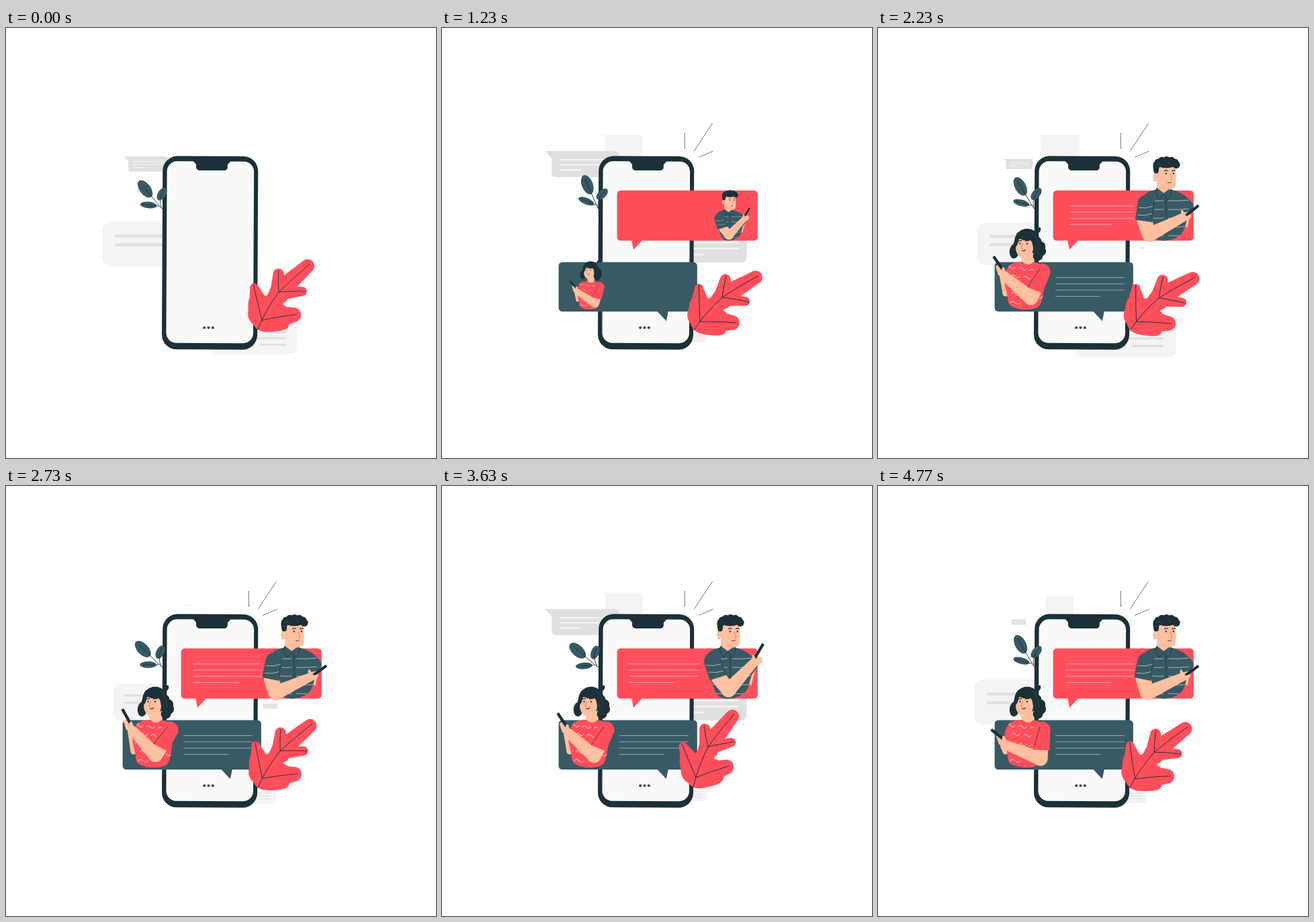
These frames come from a looping animation (640 px wide and 640 px high, 4810 ms). An HTML page with a canvas:

```html
<!DOCTYPE html>
<html lang="en">
<head>
<meta charset="utf-8">
<title>Chat</title>
<style>
html, body { margin: 0; width: 100%; height: 100%; overflow: hidden; background: #fff; }
canvas { display: block; width: 100vmin; height: 100vmin; }
</style>
</head>
<body>
<canvas id="stage" width="640" height="640"></canvas>
<script>
const g = document.getElementById('stage').getContext('2d');
const LOOP = 4810, CYCLE = 2400;
const NAVY = '#1b3039', TEAL = '#385a64', RED = '#ff4f5b', SKIN = '#ffc09f';
const LIGHT = '#f4f4f4', GREY = '#e0e0e0', WHITE = '#fafafa', LIP = '#6a2b2f', NOSE = '#c8705c';
const PI = Math.PI;

// Timing
const wave = u => (1 - Math.cos(2 * PI * u / CYCLE)) / 2;
const fall = x => (1 + Math.cos(PI * x)) / 2;
const mix = (a, b, k) => a + (b - a) * k;
const ramp = (t, from, to) => Math.min(1, Math.max(0, (t - from) / (to - from)));
const ease = (t, from, to) => 1 - fall(ramp(t, from, to));

const leafAngle = t => 49.8 - 16.5 * ramp(t, 0, 1780) + 25.9 * ease(t, 1780, 3550) - 26.2 * ease(t, 3550, 5835);
const twigAngle = t => 40.6 - 18.6 * ramp(t, 0, 1450) + 32.5 * ease(t, 1620, 3250) - 23 * ease(t, 3250, 4800);
const girlReach = t => .45 + .53 * ease(t, 1900, 2600) - .5 * ease(t, 2600, 3300) +
  .52 * ease(t, 3300, 3950) - ease(t, 3950, 4770);
const manReach = t => 1.18 * wave(t - 140) - .05;

// Drawing helpers
function placed(x, y, sx, sy, angle, draw) {
  g.save();
  g.translate(x, y);
  g.rotate(angle * PI / 180);
  g.scale(sx, sy);
  draw();
  g.restore();
}
function around(x, y, sx, sy, angle, draw) {
  placed(x, y, sx, sy, angle, () => { g.translate(-x, -y); draw(); });
}
function fill(color) { g.fillStyle = color; g.fill(); }
function poly(color, ...p) {
  g.beginPath();
  for (let i = 0; i < p.length; i += 2) g.lineTo(p[i], p[i + 1]);
  g.closePath();
  fill(color);
}
// Smooth closed curve through a few points
function blob(color, ...p) {
  const n = p.length, at = i => p[(i + n) % n];
  g.beginPath();
  g.moveTo(p[0], p[1]);
  for (let i = 0; i < n; i += 2) {
    const c = [0, 1].map(k => at(i + k) + (at(i + 2 + k) - at(i - 2 + k)) / 6);
    const d = [0, 1].map(k => at(i + 2 + k) - (at(i + 4 + k) - at(i + k)) / 6);
    g.bezierCurveTo(...c, ...d, at(i + 2), at(i + 3));
  }
  fill(color);
}
function box(color, x, y, w, h, r) {
  g.beginPath();
  g.roundRect(x, y, w, h, r);
  fill(color);
}
function oval(color, x, y, rx, ry = rx, angle = 0) {
  g.beginPath();
  g.ellipse(x, y, rx, ry, angle * PI / 180, 0, 2 * PI);
  fill(color);
}
function stroke(color, width, x1, y1, x2, y2, cx = (x1 + x2) / 2, cy = (y1 + y2) / 2) {
  g.beginPath();
  g.moveTo(x1, y1);
  g.quadraticCurveTo(cx, cy, x2, y2);
  g.strokeStyle = color;
  g.lineWidth = width;
  g.stroke();
}
// Tapered stroke with round ends
function limb(color, x1, y1, r1, x2, y2, r2) {
  const a = Math.atan2(y2 - y1, x2 - x1), s = Math.sin(a), c = Math.cos(a);
  oval(color, x1, y1, r1);
  oval(color, x2, y2, r2);
  poly(color, x1 - s * r1, y1 + c * r1, x2 - s * r2, y2 + c * r2,
    x2 + s * r2, y2 - c * r2, x1 + s * r1, y1 - c * r1);
}
// Sleeve with a round shoulder and a straight hem
function sleeve(color, x, y, hemX, hemY, r) {
  const a = Math.atan2(hemY - y, hemX - x);
  placed(x, y, 1, 1, a * 180 / PI, () =>
    box(color, -r, -r, Math.hypot(hemX - x, hemY - y) + r, 2 * r, [r, 1, 1, r]));
}
function rows(count, draw) {
  for (let i = 0; i < count; i++) draw(i);
}

// Pulsing bubbles behind the phone
function pulse(x, y, scale, draw) {
  if (scale > .004) placed(x, y, scale, scale, 0, draw);
}
function backBubbles(t) {
  pulse(269, 177.5, t < 540 ? 0 : wave(t - 540), () => {
    box(LIGHT, -42, -29, 90, 58, 5);
    poly(LIGHT, -48, -29, -36, -29, -36, -18);
  });
  pulse(208.5, 202.5, 1.025 * (t < 310 ? fall((t + 300) / 610) : wave(t - 310)), () => {
    box(GREY, -50.5, -21.5, 112, 43, [0, 6, 6, 6]);
    poly(GREY, -61.5, -21.5, -50, -21.5, -50, -9);
    rows(3, i => box(LIGHT, -36.5, -8.5 + 8.5 * i, i < 2 ? 87 : 35, 2.6, 1.3));
  });
  pulse(238.5, 321.5, 1 - wave(t), () => {
    box(LIGHT, -95.5, -33.5, 190, 67, 13);
    rows(2, i => box(GREY, -76.5, -14 + 13 * i, 150, 4.2, 2));
  });
  pulse(393.5, 327.5, wave(t) * 1.48, () => {
    box(GREY, -40.5, -14.5, 81, 29, 5);
    rows(3, i => box(LIGHT, -33, -6.4 + 6 * i, i < 2 ? 65.5 : 31, 1.8, .9));
  });
  pulse(375.5, 461, 1.25 * (t < 4430 ? wave(t - 830) : fall((t - 4430) / 560)), () => {
    box(LIGHT, -70.5, -25, 129, 50, [8, 0, 8, 8]);
    poly(LIGHT, 50, -25, 70.5, -25, 58.5, -12);
    rows(3, i => box(GREY, i < 2 ? -52 : 2.5, -10.5 + 9.8 * i, i < 2 ? 94.5 : 40, 3, 1.5));
  });
}

function phone() {
  around(303.5, 335, 1, 1, .28, () => {
    box(NAVY, 232.6, 190.8, 142, 287.8, 22);
    box(WHITE, 239, 198.6, 129.5, 270.3, 15);
    poly(NAVY, 278, 198, 334, 198, 329.2, 203, 282.4, 203);
    box(NAVY, 282.4, 198, 46.8, 14, [0, 0, 5, 5]);
  });
  rows(3, i => oval('#2f5665', 295.2 + 6.3 * i, 446, 2.2, 1.9));
}

function twig(angle) {
  around(234, 270, 1, 1, 40.6 - angle, () => {
    oval(TEAL, 207, 239.5, 15, 8.3, 53);
    oval(TEAL, 212.2, 263.5, 12.3, 4.9, 6);
    oval(TEAL, 232, 247, 10.5, 6, -58);
    stroke(NAVY, .9, 234, 271, 202, 232, 222, 258);
    stroke(NAVY, .8, 228, 265, 204, 262.5, 218, 265);
    stroke(NAVY, .8, 231.5, 268, 235, 241, 226, 254);
  });
}

// Each lobe: root, root radius, tip, tip radius
const lobes = [
  [380, 425, 20, 369.5, 386.5, 6.5],
  [389, 432, 19.5, 428, 427, 11],
  [405, 393, 12, 405.5, 366, 8],
  [410, 395, 10, 441, 392, 6.7],
  [412, 387, 14, 449, 354, 10]
];
function leaf(angle) {
  around(372, 452, 1, 1, 49.8 - angle, () => {
    blob(RED, 375, 449, 363, 430, 361, 406, 372, 392, 387, 398.5, 396, 384, 414, 371.5,
      431, 380, 419, 404, 412, 411, 419, 418, 420, 445, 396, 452);
    for (const lobe of lobes) limb(RED, ...lobe);
    stroke(NAVY, .9, 374.5, 449, 406, 393, 385, 422);
    lobes.forEach(([, , , x, y], i) => {
      const [rootX, rootY] = i < 2 ? [381, 435] : [406, 393];
      const reach = 5 / Math.hypot(x - rootX, y - rootY);
      stroke(NAVY, .9, rootX, rootY, x + (x - rootX) * reach, y + (y - rootY) * reach,
        (x + rootX) / 2 - 1, (y + rootY) / 2 - 1);
    });
  });
}

function rays(t) {
  const k = ease(t, 130, 500);
  if (!k) return;
  for (const [x1, y1, x2, y2] of [[361.4, 180, 361, 156], [375, 183.5, 402.5, 142], [382, 192.5, 403.5, 183.3]])
    stroke('#4a5357', .8, x1, y1, mix(x1, x2, k), mix(y1, y2, k));
}

function chatBubble(color, x, y, w, h, anchor, open, tail) {
  around(anchor, y, open, 1, 0, () => {
    box(color, x, y, w, h, 5.5);
    poly(color, ...tail);
  });
}
function textLines(color, x, y, gap, lastWidth, anchor, grow) {
  if (!grow) return;
  around(anchor, y, grow, 1, 0, () =>
    rows(4, i => stroke(color, .75, x, y + gap * i, x + (i < 3 ? 103 : lastWidth), y + gap * i)));
}
function chat(t) {
  const open = ease(t, 450, 950);
  if (!open) return;
  chatBubble(RED, 260.5, 241.7, 209.3, 74.8, 260.5, open, [282, 315, 285, 330, 299, 315]);
  chatBubble(TEAL, 173.6, 348.5, 206.2, 73.5, 379.8, open, [319.5, 421, 333.8, 436, 337, 421]);
  textLines('#ffc4c6', 279, 264.8, 9.2, 68, 383, ease(t, 1700, 2330));
  textLines('#b4c3c7', 264, 371.5, 9.3, 67, 264, ease(t, 1620, 2250));
}

// Brows, eyes and mouth shared by both heads
function face(x, y, gap) {
  for (const side of [0, gap]) {
    oval(NAVY, x + side, y, 1, 1.4);
    stroke(NAVY, 1.1, x + side - 2.8, y - 3.4, x + side + 2.8, y - 4, x + side, y - 5.6);
  }
}

function girl(p) {
  const ex = mix(242, 221, p), ey = mix(406, 400, p), hx = mix(184, 183, p), hy = mix(381, 358, p);
  const sx = 244, sy = 363, hemX = mix(sx, ex, .66), hemY = mix(sy, ey, .7);
  limb(SKIN, 190, 395, 4.5, hx + 2, hy + 6, 4);
  g.save();
  blob(RED, 213, 348, 196, 353, 188, 372, 192, 396, 197, 413, 220, 419, 241, 412, 248, 380, 250, 358, 231, 348);
  g.clip();
  rows(12, i => {
    const row = Math.floor(i / 3), x = 192 + row % 2 * 7 + i % 3 * 17, y = 357 + row * 13 + i % 3 * 2;
    stroke('#ffe6e6', .9, x, y, x + 6, y, x + 3, y - 5);
    stroke('#ffe6e6', .9, x + 6, y, x + 12, y - 1, x + 9, y + 4);
  });
  rows(2, i => stroke('#ffe6e6', .9, 196 + 8 * i, 409, 204 + 8 * i, 409, 200 + 8 * i, 405 + 8 * i));
  g.restore();
  blob(SKIN, 215, 338, 230, 337, 231, 348, 223, 352, 215, 348);

  limb(SKIN, ex, ey, 10.5, hx + 5, hy + 4, 7);
  limb(SKIN, hemX, hemY, 10.5, ex, ey, 10.5);
  sleeve(RED, sx, sy, hemX, hemY, 12.5);
  stroke(NAVY, .7, sx - 3, sy - 5, hemX - 10, hemY - 5);
  limb(SKIN, hx, hy, 5, hx - 5, hy - 9, 3);
  stroke(NAVY, 4.3, mix(168.5, 173.5, p), mix(362.5, 330, p), mix(187.5, 184.5, p), mix(377.5, 351, p));
  limb(SKIN, hx + 4, hy + 2, 4.5, hx + 3, hy - 7, 2);

  oval(NAVY, 222, 318, 19, 19.3);
  oval(NAVY, 203, 332, 7.2, 11, 8);
  oval(NAVY, 240, 300.5, 2, 4, 15);
  rows(4, i => oval(NAVY, 236 + 7 * Math.sin(i * .95), 318 + 7 * i, 7.5));
  oval(SKIN, 218, 327, 13, 16);
  oval(NAVY, 222, 309, 16, 7.5, 4);
  oval(NAVY, 205.5, 319, 3, 8, 18);
  oval(NAVY, 234, 322, 4, 12, -8);
  stroke(TEAL, .6, 228, 304, 240, 330, 239, 312);
  stroke(TEAL, .6, 234, 322, 244, 340, 234, 334);
  face(211.5, 321, 10.3);
  stroke(NOSE, .8, 216, 320, 215.5, 328.5, 211, 329);
  stroke(LIP, 1.3, 214, 331, 220, 329.5, 218, 333);
}

function man(p) {
  const ex = mix(401, 424, p), ey = mix(308, 304, p), hx = mix(455, 466, p), hy = mix(282, 262, p);
  const sx = mix(399, 402.5, p), sy = 261, hemX = mix(393.5, 409, p), hemY = mix(287.5, 285.5, p);
  const stripe = '#c3ced2';
  poly(SKIN, 451, 284, 460, 298, 467, 270, 459, 266);
  g.save();
  blob(TEAL, 414, 240.5, 397, 248, 392, 264, 403, 296, 412, 313, 432, 316, 452, 306, 461, 282, 469.5, 265, 456, 249, 436, 240.5);
  g.clip();
  rows(5, i => {
    const y = 256 + 13 * i;
    stroke(stripe, .8, 402, y, 425, y + 1, 414, y + 2);
    stroke(stripe, .8, 432, y + 1, 463, y, 446, y + 2);
  });
  g.restore();
  stroke(NAVY, .7, 428, 248, 430, 290);
  poly(SKIN, 415, 224, 435, 230, 435, 243, 427, 248, 415, 240);
  for (const [x, dir] of [[415, 1], [435.5, -1]]) {
    poly(TEAL, x, 238, x + 12 * dir, 247, x + 4 * dir, 255, x - 3 * dir, 244);
    stroke(NAVY, .8, x, 238, x + 4 * dir, 255, x - 4 * dir, 246);
    stroke(NAVY, .8, x + 4 * dir, 255, x + 10 * dir, 247);
  }

  limb(SKIN, hemX + 1, hemY, 11, ex, ey, 10.8);
  limb(SKIN, ex, ey, 10.8, hx - 3, hy + 3, 6.5);
  sleeve(TEAL, sx, sy, hemX, hemY, 12.8);
  rows(2, i => {
    const k = .2 + .42 * i, x = mix(sx, hemX, k), y = mix(sy, hemY, k);
    stroke(stripe, .8, x - 11, y + 1, x + 11, y - 1, x, y + 3);
  });
  stroke(NAVY, .7, sx + 11, sy - 2, hemX + 12, hemY - 4);
  limb(SKIN, hx, hy, 4.8, hx + 6, hy - 3, 3);
  stroke(NAVY, 4.2, mix(457.5, 464, p), mix(282, 260, p), mix(477, 478, p), mix(268, 238, p));
  limb(SKIN, hx + 2, hy + 4, 3.5, hx + 8, hy + 1, 2);
  limb(SKIN, hx - 2, hy, 3, hx - 4, hy - 7, 1.6);

  blob(SKIN, 412, 211, 427, 204, 441.5, 207, 443.5, 222, 442, 236, 433, 240.5, 421, 236, 414, 226);
  oval(SKIN, 412.5, 221.5, 3.4, 5);
  stroke(NAVY, .9, 411, 226.5, 413, 226.5, 412, 229);
  oval(NAVY, 429, 202.5, 14, 6);
  limb(NAVY, 414, 206, 4.5, 414, 213, 3.6);
  rows(7, i => {
    const a = PI * (1.02 + .16 * i);
    oval(NAVY, 429.5 + 14.5 * Math.cos(a), 204 + 7.5 * Math.sin(a), 5.6);
  });
  stroke(TEAL, .6, 418, 200, 424, 203, 418, 205);
  stroke(TEAL, .6, 432, 198, 438, 202, 431, 203);
  face(428.7, 216.5, 11);
  stroke(NOSE, .8, 434.5, 217, 435, 226, 440, 226);
  stroke(LIP, 1, 431, 230, 437, 229, 435, 231.5);
  stroke('#e09077', .7, 425, 236, 434, 239.5, 428, 240);
}

function people(t) {
  const pop = ease(t, 950, 1450);
  if (!pop) return;
  around(428, 316, pop, pop, 0, () => man(manReach(t)));
  around(220, 419, pop, pop, 0, () => girl(girlReach(t)));
}

function frame(t) {
  g.fillStyle = '#fff';
  g.fillRect(0, 0, 640, 640);
  backBubbles(t);
  phone();
  twig(twigAngle(t));
  chat(t);
  people(t);
  rays(t);
  leaf(leafAngle(t));
}

const start = performance.now();
function tick() {
  frame((performance.now() - start) % LOOP);
  requestAnimationFrame(tick);
}
tick();
</script>
</body>
</html>
```
